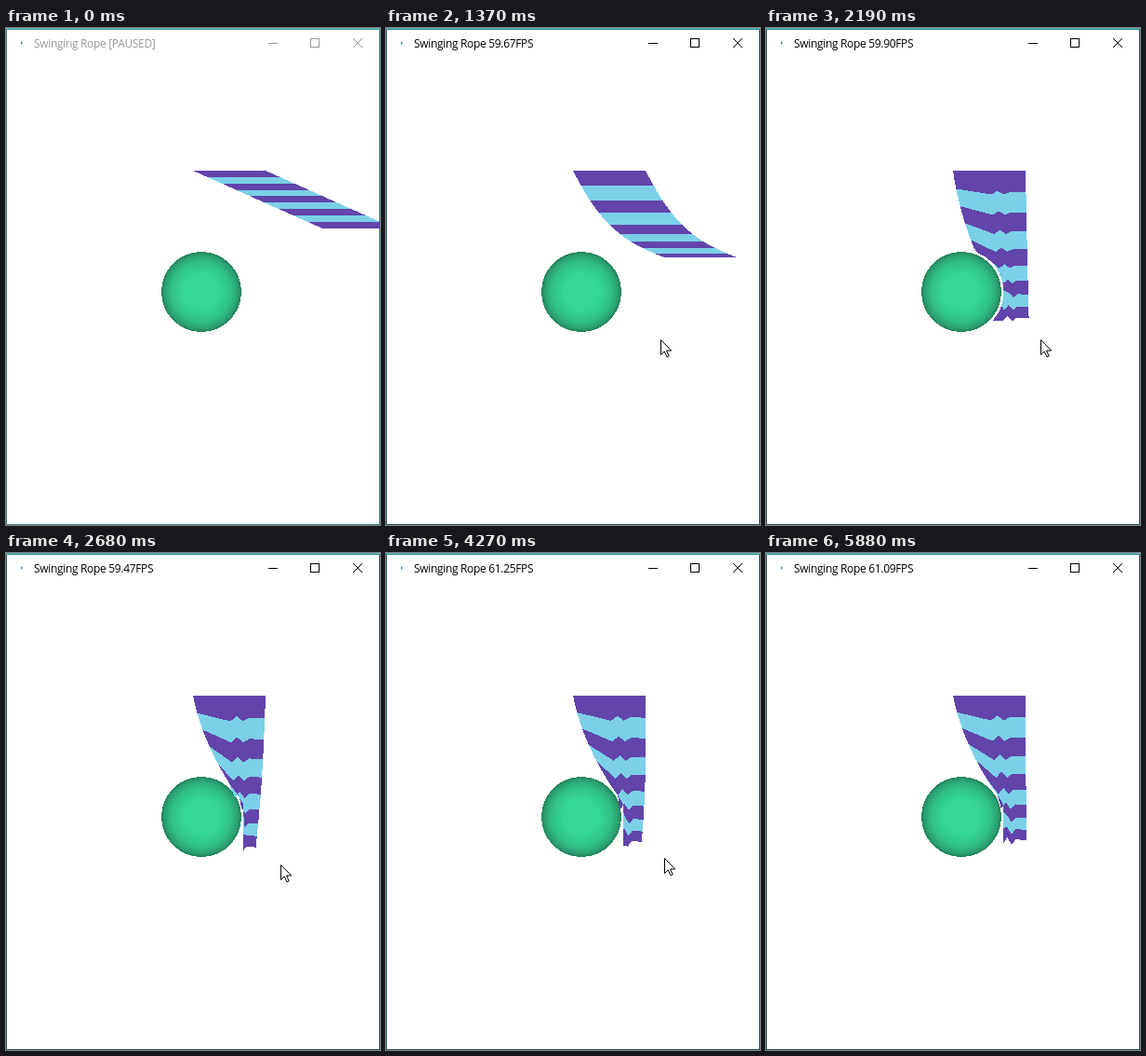
Write an HTML page that moves like this. It is 402 px wide and 533 px high and loops after 5.94 s.

```html
<!DOCTYPE html>
<html lang="en">
<head>
<meta charset="utf-8">
<title>Swinging Rope</title>
<style>
  html, body { margin: 0; width: 100%; height: 100%; overflow: hidden; background: #fff; }
  svg { display: block; width: 402px; height: 533px; }
  text { font: 12px "Open Sans", "Noto Sans", sans-serif; letter-spacing: -.33px; white-space: pre; }
  .crisp { shape-rendering: crispEdges; }
</style>
</head>
<body>
<svg viewBox="0 0 402 533">
  <defs>
    <radialGradient id="shade">
      <stop offset="0" stop-color="#36d999"/>
      <stop offset=".45" stop-color="#35d696"/>
      <stop offset=".75" stop-color="#30bf86"/>
      <stop offset=".92" stop-color="#2a9f71"/>
      <stop offset="1" stop-color="#228058"/>
    </radialGradient>
  </defs>
  <path id="border" class="crisp" fill="none" d="M.5 1V532.5H401.5V1"/>
  <path class="crisp" stroke="#5fb4b8" d="M0 .5H402"/>
  <path id="top" class="crisp" d="M0 1.5H402"/>
  <path d="M16 14l2 2-2 2z" fill="#3a86b4"/>
  <text id="title" x="30" y="21"></text>
  <g id="buttons" fill="none">
    <path class="crisp" d="M282 16.5h10M327.5 11.5h9v9h-9z"/>
    <path d="M373 11l10 10M383 11l-10 10"/>
  </g>
  <circle class="crisp" cx="210" cy="283" r="43" fill="url(#shade)"/>
  <g id="cloth" class="crisp"></g>
  <path id="cursor" fill="#fff" stroke="#000" d="M.5.5v16l3.7-3.6 2.8 5.9 2.2-1-2.7-5.8h5.2z"/>
</svg>
<script>
const LOOP = 5940, STEP = 67.5, STRIPES = 9, SUB = 4;
const WIDTH = 77, LEFT = 201, RIGHT = 279, TOP = 153;
const ball = { x: 210, y: 283, r: 45.5 };   // radius includes the contact gap
const $ = id => document.getElementById(id);

// step, angle at top and tip in degrees, length, taper of the stripes, drape, frame rate
const keys = [
  [2, 66, 66, 152, 0, 0, 60.3],
  [20, 28, 69, 140, .22, 0, 59.67],
  [26, 10, 30, 149, .32, 0, 59.88],
  [31, 2, 4, 157, .36, .6, 59.95],
  [39, -2, -6, 163, .38, 1, 59.47],
  [53, 0, -8, 159, .4, 1, 61.22],
  [75, .7, .7, 155, .4, 1, 60.98],
  [87, .3, .3, 155, .4, 1, 61.09]
];

const mix = (a, b, t) => a + (b - a) * t;
const smooth = t => t * t * (3 - 2 * t);
const ease = (t, from, to) => smooth(Math.min(Math.max((t - from) / (to - from), 0), 1));

// Hermite curve through the keys, at rest at both ends
function stateAt(t) {
  const last = keys.length - 1;
  t = Math.min(Math.max(t, keys[0][0]), keys[last][0]);
  let i = 0;
  while (i < last - 1 && t >= keys[i + 1][0]) i++;
  const a = keys[i], b = keys[i + 1], span = b[0] - a[0], s = (t - a[0]) / span;
  const slope = (n, j) => n === 0 || n === last ? 0 :
    (keys[n + 1][j] - keys[n - 1][j]) / (keys[n + 1][0] - keys[n - 1][0]) * span;
  const value = j => mix(a[j], b[j], smooth(s)) +
    slope(i, j) * s * (1 - s) ** 2 - slope(i + 1, j) * s * s * (1 - s);
  const [top, tip, length, taper, drape, rate] = [1, 2, 3, 4, 5, 6].map(value);
  return { top, tip, length, taper, drape, rate };
}

// A hanging chain: the angle changes from top to tip, upper parts stretch more
function rightEdge({ top, tip, length, taper }) {
  const count = STRIPES * SUB, points = [[RIGHT, TOP]];
  for (let i = 0; i < count; i++) {
    const u = (i + .5) / count, [x, y] = points[i];
    const angle = mix(top, tip, smooth(u)) * Math.PI / 180;
    const link = length / count * (1 + taper * (1 - 2 * u));
    points.push([x + link * Math.sin(angle), y + link * Math.cos(angle)]);
  }
  return points;
}

// The other side runs parallel, then drapes over the ball
function leftPoint([rx, ry], u, drape) {
  const y = ry - drape * 15 * Math.sin(3.4 * u), d = y - TOP;
  const draped = Math.min(LEFT + .2 * d + .0023 * d * d, 255);
  const reach = ball.r ** 2 - (y - ball.y) ** 2;
  const surface = reach > 0 ? ball.x + Math.sqrt(reach) : 0;
  return [Math.max(mix(rx - RIGHT + LEFT, draped, drape), surface), y];
}

// A stripe border: a zigzag of folds, squeezed where the cloth is narrow
function seam(l, r, row, drape) {
  if (row === 0) return [l, r];
  const width = r[0] - l[0], squeeze = .5 + width / WIDTH / 2;
  const folds = [3, -2, 3, -.5].map((dy, i) =>
    [r[0] - (38 - 7 * i) * squeeze, r[1] + dy * drape * (1 + row / 15)]);
  return [l, ...folds.filter(f => f[0] > l[0] + 1), r];
}

const bands = Array.from({ length: STRIPES }, (_, i) => {
  const band = document.createElementNS("http://www.w3.org/2000/svg", "polygon");
  band.setAttribute("fill", i % 2 ? "#7bd0e8" : "#6244aa");
  return $("cloth").appendChild(band);
});

function drawCloth(state) {
  const right = rightEdge(state);
  const left = right.map((p, i) => leftPoint(p, i / (right.length - 1), state.drape));
  const row = i => seam(left[i * SUB], right[i * SUB], i, state.drape);
  bands.forEach((band, i) => {
    const side = edge => edge.slice(i * SUB + 1, (i + 1) * SUB);
    const outline = [...row(i), ...side(right), ...row(i + 1).reverse(), ...side(left).reverse()];
    band.setAttribute("points", outline.map(p => p.map(v => v.toFixed(2))).join(" "));
  });
}

function drawWindow(step, rate) {
  const paused = step < 2, ink = paused ? "#999" : "#000";
  $("title").textContent = "Swinging Rope " + (paused ? "[PAUSED]" : rate.toFixed(2) + "FPS");
  $("title").setAttribute("fill", ink);
  $("buttons").setAttribute("stroke", ink);
  $("border").setAttribute("stroke", paused ? "#3f8085" : "#28585b");
  $("top").setAttribute("stroke", paused ? "#4a9fa5" : "#2f8e92");

  const nudge = ease(step, 53, 60), leave = ease(step, 76, 85);
  const x = Math.round(295 + 4 * nudge + 73 * leave), y = Math.round(334 - 7 * nudge + 188 * leave);
  $("cursor").setAttribute("transform", `translate(${x} ${y})`);
  $("cursor").setAttribute("visibility", paused || step > 85 ? "hidden" : "visible");
}

const start = performance.now();
function frame() {
  const step = Math.floor((performance.now() - start) % LOOP / STEP);
  const state = stateAt(step);
  drawWindow(step, state.rate);
  drawCloth(state);
  requestAnimationFrame(frame);
}
frame();
</script>
</body>
</html>
```
